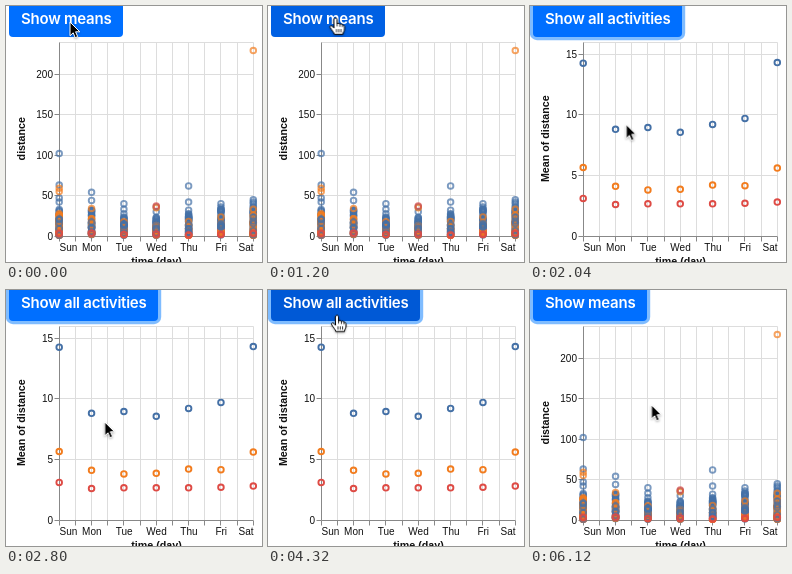
Write an HTML page that moves like this. It is 256 px wide and 256 px high and loops after 6920 ms.

```html
<!DOCTYPE html>
<html lang="en">
<head>
<meta charset="utf-8">
<title>Activity distances</title>
<style>
  html, body { margin: 0; width: 100%; height: 100%; overflow: hidden; background: #fff; }
  body { position: relative; }
  svg { position: absolute; left: 0; top: 0; }
  text { font: 10px "Liberation Sans", Arial, sans-serif; fill: #111; }
  .title { font-size: 10.7px; font-weight: bold; text-anchor: middle; }
  .grid { stroke: #ddd; }
  .axis { stroke: #888; }

  .btn {
    position: absolute; left: 3px; top: -7px; height: 38px; border-radius: 4px;
    font: 600 15px/39px Inter, sans-serif; letter-spacing: -.25px; text-indent: .5px;
    color: #fff; text-align: center; white-space: nowrap;
  }
  .btn.all {
    width: 114px;
    animation: hover 6920ms linear infinite, ring 6920ms linear infinite, all 6920ms step-end infinite;
  }
  .btn.mean {
    width: 149px;
    animation: hover 6920ms linear infinite, ring 6920ms linear infinite, mean 6920ms step-end infinite;
  }
  g.all { animation: all 6920ms step-end infinite; }
  g.mean { animation: mean 6920ms step-end infinite; }
  .arrow { animation: arrow 6920ms step-end infinite; }
  .hand { animation: hand 6920ms step-end infinite; }
  .cursor { animation: move 6920ms ease-in-out infinite; filter: drop-shadow(0 1px 1px rgba(0, 0, 0, .3)); }

  /* clicks at 1400 and 4720 ms */
  @keyframes all { 0%, 68.208% { visibility: visible; } 20.231% { visibility: hidden; } }
  @keyframes mean { 0%, 68.208% { visibility: hidden; } 20.231% { visibility: visible; } }
  @keyframes ring {
    0%, 20.231% { box-shadow: 0 0 0 0 rgba(0, 123, 255, 0); }
    22.399%, 100% { box-shadow: 0 0 0 3.2px rgba(0, 123, 255, .5); }
  }
  @keyframes hover {
    0%, 15.9%, 28.2%, 52.02%, 78.76%, 100% { background: #006fff; }
    18.07%, 26.01%, 54.19%, 76.59% { background: #0059d6; }
  }
  @keyframes arrow { 0%, 26.01%, 76.59% { visibility: visible; } 15.9%, 52.02% { visibility: hidden; } }
  @keyframes hand { 0%, 26.01%, 76.59% { visibility: hidden; } 15.9%, 52.02% { visibility: visible; } }
  @keyframes move {
    0%, 8% { transform: translate(64px, 16px); }
    15.9%, 24.5% { transform: translate(67.5px, 12px); animation-timing-function: ease-in; }
    27.5% { transform: translate(86px, 66px); animation-timing-function: ease-out; }
    31.5% { transform: translate(101px, 143px); }
    35% { transform: translate(98px, 127px); }
    38%, 43.5% { transform: translate(98.7px, 132px); }
    53.2%, 75.2% { transform: translate(69px, 25.2px); animation-timing-function: ease-in; }
    80.5% { transform: translate(140px, 98px); animation-timing-function: ease-out; }
    87.5%, 100% { transform: translate(121.5px, 115px); }
  }
</style>
</head>
<body>
<svg width="256" height="256" viewBox="0 0 256 256">
  <g id="frame"></g>
  <g class="all" id="all"></g>
  <g class="mean" id="mean"></g>
</svg>
<div class="btn all">Show means</div>
<div class="btn mean">Show all activities</div>
<svg width="256" height="256" viewBox="0 0 256 256">
  <g class="cursor">
    <path class="arrow" fill="#000" stroke="#fff" d="M0 0V13.8L3.2 10.8 5.2 15.7 7.7 14.6 5.6 9.8H9.8Z"/>
    <g class="hand" stroke="#000" stroke-linejoin="round" stroke-linecap="round">
      <path fill="#fff" d="M-1.7 1.6C-1.7-.5 1.5-.5 1.6 1.6V6C2 4.8 4.2 5 4.4 6.4 5 5.5 6.9 5.9 7 7.2 7.7 6.7 9 7.2 9 8.6V11C9 13.5 7.5 14 7.5 16.3H-1.2C-1.5 14.5-3.5 12.5-5.2 9.8-6.4 8-4.3 7-3 8.4L-1.7 9.8Z"/>
      <path fill="none" stroke-width=".8" d="M1.6 6V8M4.4 6.4V8.4M7 7.2V8.8M1 11.5V14M3.3 11.5V14M5.6 11.5V14"/>
    </g>
  </g>
</svg>
<script>
  const LEFT = 53.2, RIGHT = 247.3, TOP = 36, BASE = 230;
  const BLUE = '#4470a6', ORANGE = '#f27c1e', RED = '#de4b45';
  const days = ['Sun', 'Mon', 'Tue', 'Wed', 'Thu', 'Fri', 'Sat'];
  const dayX = i => LEFT + i * (RIGHT - LEFT) / 6;
  const snap = v => Math.floor(v) + .5;

  function add(parent, tag, attrs, content = '') {
    const el = document.createElementNS('http://www.w3.org/2000/svg', tag);
    for (const key in attrs) el.setAttribute(key, attrs[key]);
    el.textContent = content;
    parent.append(el);
  }
  const line = (g, cls, x1, y1, x2, y2) =>
    add(g, 'line', { class: cls, x1: snap(x1), y1: snap(y1), x2: snap(x2), y2: snap(y2) });

  function yAxis(g, max, step, title) {
    const y = v => BASE - v / max * (BASE - TOP);
    for (let v = 0; v <= max; v += step) {
      line(g, 'grid', LEFT, y(v), RIGHT, y(v));
      line(g, 'axis', LEFT - 5, y(v), LEFT, y(v));
      add(g, 'text', { x: 47, y: y(v) + 3.5, 'text-anchor': 'end' }, v);
    }
    line(g, 'axis', LEFT, TOP, LEFT, BASE);
    line(g, 'axis', LEFT, BASE, RIGHT, BASE);
    add(g, 'text', { class: 'title', transform: 'translate(19 132.7) rotate(-90)' }, title);
    return (day, v, stroke, opacity = .7) => add(g, 'circle', {
      cx: dayX(day), cy: y(v), r: 2.8, fill: 'none', stroke, opacity, 'stroke-width': 1.9
    });
  }

  // a tick every half day, a label on every full one
  const frame = document.getElementById('frame');
  line(frame, 'grid', LEFT, TOP, RIGHT, TOP);
  for (let i = 0; i <= 6; i += .5) {
    const x = dayX(i);
    line(frame, 'grid', x, TOP, x, BASE);
    line(frame, 'axis', x, BASE, x, BASE + 5);
    if (days[i]) {
      add(frame, 'text', { x: x + .3, y: 245.3, 'text-anchor': i == 0 ? 'start' : i == 6 ? 'end' : 'middle' }, days[i]);
    }
  }
  add(frame, 'text', { class: 'title', x: 150.5, y: 259 }, 'time (day)');

  const mean = yAxis(document.getElementById('mean'), 16, 5, 'Mean of distance');
  [
    [BLUE, [14.25, 8.8, 8.95, 8.55, 9.2, 9.7, 14.3]],
    [ORANGE, [5.65, 4.1, 3.8, 3.85, 4.2, 4.15, 5.6]],
    [RED, [3.1, 2.6, 2.65, 2.65, 2.65, 2.7, 2.8]]
  ].forEach(([color, values]) => values.forEach((v, i) => mean(i, v, color, 1)));

  let seed = 11;
  const random = () => (seed = seed * 16807 % 2147483647) / 2147483647;

  const dot = yAxis(document.getElementById('all'), 240, 50, 'distance');
  const scatter = (day, count, color, spread, bend) => {
    for (let n = 0; n < count; n++) dot(day, 1 + spread * random() ** bend, color);
  };
  const tops = [[102, 63, 47, 42], [54, 44], [40, 33], [36, 30], [62, 42, 32], [40, 36], [45, 42, 40]];
  const spread = [38, 31, 27, 22, 27, 34, 38];
  const oranges = [20, 11, 6, 7, 9, 6, 24];
  tops.forEach((top, i) => {
    top.forEach(v => dot(i, v, BLUE));
    scatter(i, 30, BLUE, spread[i], 1.2);
    scatter(i, 5, RED, 6, 1);
    scatter(i, oranges[i], ORANGE, spread[i] * .7, 1.6);
    scatter(i, 5, BLUE, spread[i] * .6, 1);
    scatter(i, 2, RED, 3, 1);
  });
  [[0, 59], [0, 55], [1, 34], [3, 35], [6, 33], [6, 229.5]].forEach(([i, v]) => dot(i, v, ORANGE));
  dot(3, 37, RED);
</script>
</body>
</html>
```
